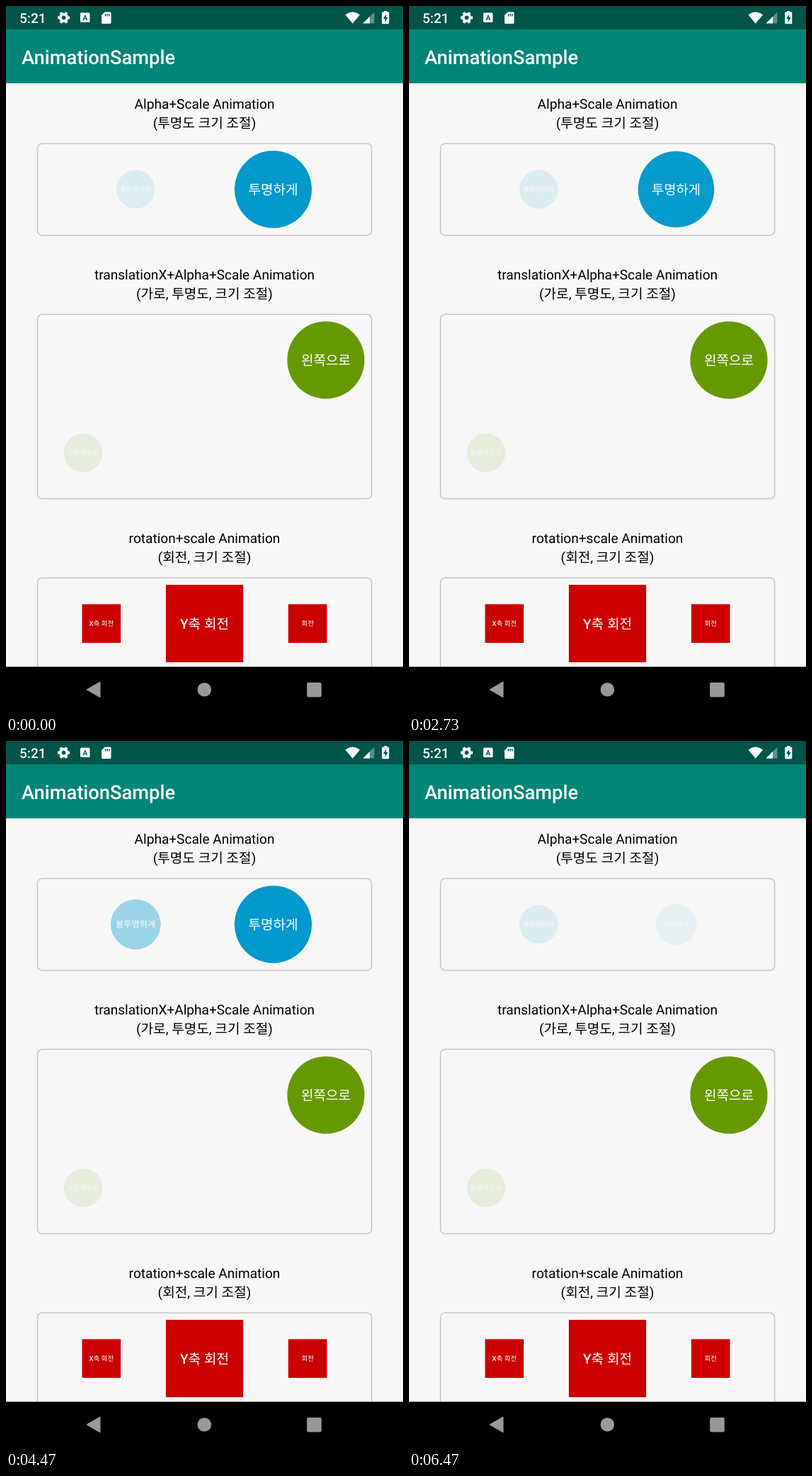
Recreate the animation shown at these times as an HTML page. Size 561 px wide and 998 px high, loop 6500 ms.

```html
<!DOCTYPE html>
<html lang="ko">
<head>
<meta charset="utf-8">
<title>AnimationSample</title>
<style>
  html, body { margin: 0; width: 100%; height: 100%; overflow: hidden; background: #f7f7f7; }
  svg { display: block; width: 561px; height: 998px; }
  text {
    font: 19.1px Roboto, "Noto Sans CJK KR", "Noto Sans CJK", sans-serif;
    text-rendering: geometricPrecision;
  }
  .medium { font-weight: 500; }
  .bar { fill: #fff; }
  .title { font-size: 27.3px; }
  .label text, .button text { text-anchor: middle; }
  .button text { fill: #fff; }
  .button .shape { filter: drop-shadow(0 1.6px 1.5px rgba(0, 0, 0, .26)); }
  .panel { fill: none; stroke: #c7c7cb; stroke-width: 1.5; }
  .blue { fill: #0099cc; }
  .green { fill: #669900; }
  .red { fill: #cc0000; }
</style>
</head>
<body>
<svg viewBox="0 0 561 998">
  <defs>
    <linearGradient id="shade" x2="0" y2="1">
      <stop stop-opacity=".08"/>
      <stop offset="1" stop-opacity="0"/>
    </linearGradient>
    <circle id="disc" class="shape" r="54.6"/>
    <rect id="tile" class="shape" x="-54.6" y="-54.6" width="109.2" height="109.2"/>
  </defs>
  <rect width="561" height="998" fill="#f7f7f7"/>

  <g class="label">
    <text x="280.5" y="145">Alpha+Scale Animation</text>
    <text x="280.5" y="171.5">(투명도 크기 조절)</text>
    <text x="280.5" y="386">translationX+Alpha+Scale Animation</text>
    <text x="280.5" y="412.5">(가로, 투명도, 크기 조절)</text>
    <text x="280.5" y="758">rotation+scale Animation</text>
    <text x="280.5" y="784.5">(회전, 크기 조절)</text>
  </g>

  <rect class="panel" x="44.5" y="194.3" width="472.2" height="129.4" rx="6.5"/>
  <rect class="panel" x="44.5" y="435.2" width="472.2" height="260.4" rx="6.5"/>
  <rect class="panel" x="44.5" y="807.2" width="472.2" height="180" rx="6.5"/>

  <g class="button" id="show"><use href="#disc" class="blue"/><text y="6.8">불투명하게</text></g>
  <g class="button" id="hide"><use href="#disc" class="blue"/><text y="6.8">투명하게</text></g>
  <g class="button" transform="translate(452 499.8)"><use href="#disc" class="green"/><text y="6.8">왼쪽으로</text></g>
  <g class="button" transform="translate(109 630.8) scale(.5)" opacity=".1"><use href="#disc" class="green"/><text y="6.8">오른쪽으로</text></g>
  <g class="button" transform="translate(134.8 871.7) scale(.5)"><use href="#tile" class="red"/><text y="6.8"><tspan class="medium">X</tspan>축 회전</text></g>
  <g class="button" transform="translate(280.5 871.7)"><use href="#tile" class="red"/><text y="6.8"><tspan class="medium">Y</tspan>축 회전</text></g>
  <g class="button" transform="translate(426.2 871.7) scale(.5)"><use href="#tile" class="red"/><text y="6.8">회전</text></g>

  <!-- app bar and status bar -->
  <rect y="109" width="561" height="4" fill="url(#shade)"/>
  <rect y="33" width="561" height="76" fill="#008577"/>
  <rect width="561" height="33" fill="#005549"/>
  <g class="bar">
    <text class="medium title" x="22" y="81.5">AnimationSample</text>
    <text class="medium" x="19" y="23.5">5:21</text>
    <g fill="none" stroke="#fff" transform="translate(81.5 16.5)">
      <circle r="4.8" stroke-width="3.8"/>
      <circle r="7.2" stroke-width="2.8" pathLength="12" stroke-dasharray="1 1" stroke-dashoffset=".5"/>
    </g>
    <rect x="105" y="9.5" width="13.5" height="13.5" rx="1.5"/>
    <text x="111.8" y="20" text-anchor="middle" style="font-size:10px;font-weight:700;fill:#005549">A</text>
    <path d="M139.500 8.500H147a1.500 1.500 0 0 1 1.500 1.500V23.500a1.500 1.500 0 0 1-1.500 1.500H136.500a1.500 1.500 0 0 1-1.500-1.500V13Z"/>
    <path d="M140.500 11v3.500M143.200 11v3.500M145.900 11v3.500" stroke="#005549" stroke-width="1.400"/>
    <path d="M479.500 12.500Q489.800 4.500 500 12.500L489.800 24.800Z"/>
    <path d="M520.500 8.500V24.500H504.500Z" opacity=".35"/>
    <path d="M514 15V24.500H504.500Z"/>
    <path d="M534 8.500V7h4.500v1.500H540a1.300 1.300 0 0 1 1.300 1.300V24a1.300 1.300 0 0 1-1.300 1.300H532.500a1.300 1.300 0 0 1-1.300-1.300V9.800a1.300 1.300 0 0 1 1.300-1.300Z"/>
    <path d="M537.200 11.500L533 18h2.600v4.700L539.700 16h-2.500Z" fill="#005549"/>
  </g>

  <!-- navigation bar -->
  <rect y="932.700" width="561" height="65.300"/>
  <g fill="#999">
    <path d="M114 965L133 954V976Z" stroke="#999" stroke-linejoin="round"/>
    <circle cx="280.300" cy="965" r="9.800"/>
    <rect x="425.200" y="955" width="20.600" height="20.600" rx="2"/>
  </g>
</svg>
<script>
  const LOOP = 6500, DURATION = 1060;
  const show = document.getElementById("show");
  const hide = document.getElementById("hide");

  // accelerate-decelerate progress of a run that begins at start
  const ease = (t, start) => {
    const p = Math.min(1, Math.max(0, (t - start) / DURATION));
    return (1 - Math.cos(Math.PI * p)) / 2;
  };

  function pose(node, x, size, alpha) {
    node.setAttribute("transform", `translate(${x} 258.8) scale(${0.5 + size / 2})`);
    node.setAttribute("opacity", alpha);
  }

  function draw(t) {
    if (t > 6210 && t < 6440) t = 6210; // stalls briefly

    // each button snaps back when the other one starts
    const grown = t < 2590 ? ease(t, 1097)
      : t >= 4030 && t < 5560 ? ease(t, 4085) : 0;
    const left = t < 4030 ? 1 - ease(t, 2615) : 1 - ease(t, 5585);

    pose(show, 183.3, grown, 0.1 + 0.9 * grown);
    pose(hide, 377.5, left, left);
  }

  const begin = performance.now();
  function tick() {
    draw((performance.now() - begin) % LOOP);
    requestAnimationFrame(tick);
  }
  tick();
</script>
</body>
</html>
```
